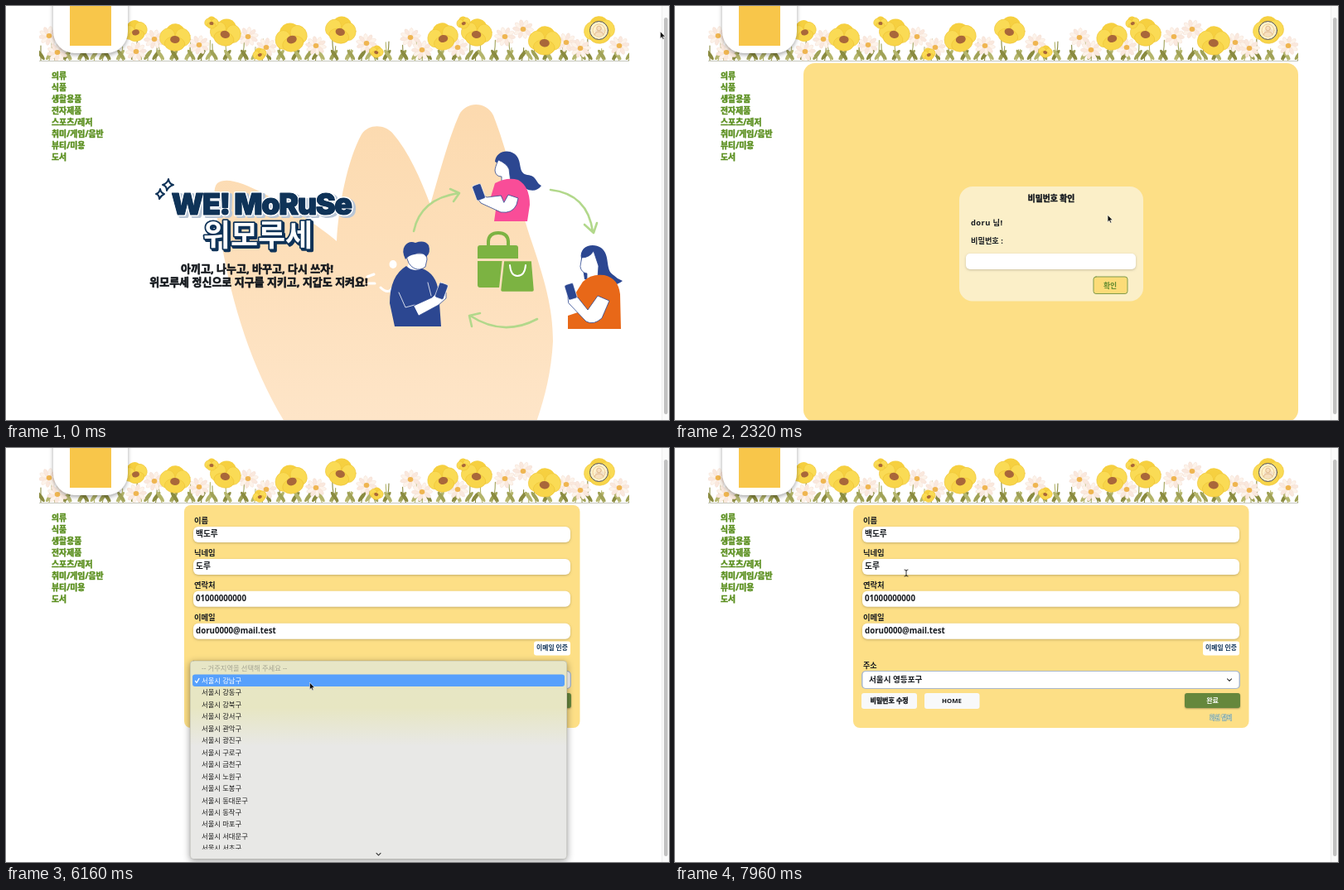
Animation of 800 by 500 pixels, one loop 8000 ms. Source, as an HTML page with a canvas:

```html
<!DOCTYPE html>
<html lang="ko">
<head>
<meta charset="utf-8">
<title>Member page walkthrough</title>
<style>
html, body { margin: 0; width: 100%; height: 100%; overflow: hidden; background: #fff; }
canvas { display: block; width: 800px; height: 500px; }
</style>
</head>
<body>
<canvas id="stage" width="800" height="500"></canvas>
<script>
const ctx = document.getElementById('stage').getContext('2d');
const LOOP = 8000;
const FONT = '"Noto Sans", "Noto Sans CJK KR", "Noto Sans CJK JP", sans-serif';
const NAVY = '#0f3358', BLUE = '#2c4791', INK = '#161a1f', YELLOW = '#fddf86';

const clamp = v => Math.max(0, Math.min(1, v));
const ramp = (t, a, b) => clamp((t - a) / (b - a));
const ease = v => v * v * (3 - 2 * v);

function text(s, x, y, size, color = INK, weight = 700, align = 'left', space = 0, font = FONT) {
  ctx.font = `${weight} ${size}px ${font}`;
  ctx.letterSpacing = space + 'px';
  ctx.textAlign = align;
  ctx.fillStyle = ctx.strokeStyle = color;
  ctx.fillText(s, x, y + size * 0.36);
  // Thicken the heaviest weight towards a display face.
  if (weight === 900) {
    ctx.lineWidth = size * 0.05;
    ctx.strokeText(s, x, y + size * 0.36);
  }
}

function outlined(s, x, y, size, fill, line, width, space = 0, font = FONT) {
  ctx.font = `900 ${size}px ${font}`;
  ctx.letterSpacing = space + 'px';
  ctx.textAlign = 'center';
  ctx.lineJoin = 'round';
  ctx.lineWidth = width;
  ctx.strokeStyle = line;
  ctx.strokeText(s, x, y + size * 0.36);
  ctx.fillStyle = fill;
  ctx.fillText(s, x, y + size * 0.36);
}

function shape(d, fill, line, width = 1) {
  const p = new Path2D(d);
  if (fill) { ctx.fillStyle = fill; ctx.fill(p); }
  if (line) {
    ctx.lineWidth = width;
    ctx.lineJoin = ctx.lineCap = 'round';
    ctx.strokeStyle = line;
    ctx.stroke(p);
  }
}

function box(x, y, w, h, r, fill, line, width = 1) {
  ctx.beginPath();
  ctx.roundRect(x, y, w, h, r);
  if (fill) { ctx.fillStyle = fill; ctx.fill(); }
  if (line) { ctx.lineWidth = width; ctx.strokeStyle = line; ctx.stroke(); }
}

function oval(x, y, rx, ry, fill, line, width = 1, turn = 0) {
  ctx.beginPath();
  ctx.ellipse(x, y, rx, ry, turn, 0, 7);
  if (fill) { ctx.fillStyle = fill; ctx.fill(); }
  if (line) { ctx.lineWidth = width; ctx.strokeStyle = line; ctx.stroke(); }
}

function shadowed(color, blur, dy, draw) {
  ctx.save();
  ctx.shadowColor = color;
  ctx.shadowBlur = blur;
  ctx.shadowOffsetY = dy;
  draw();
  ctx.restore();
}

function at(x, y, turn, draw, scale = 1) {
  ctx.save();
  ctx.translate(x, y);
  ctx.rotate(turn);
  ctx.scale(scale, scale);
  draw();
  ctx.restore();
}

// Banner
const poppies = [[204, 38, 18], [265, 32, 18], [248, 20, 8], [344, 38, 19], [404, 29, 18], [447, 55, 8],
  [527, 37, 18], [568, 32, 18], [552, 20, 8], [650, 42, 19], [716, 29, 18], [156, 30, 14], [306, 58, 8]];
const daisies = [[179, 40], [233, 47], [292, 37], [314, 50], [374, 48], [435, 45], [488, 38], [502, 53],
  [545, 50], [602, 37], [624, 28], [676, 44], [693, 51], [740, 48], [157, 55], [52, 36], [62, 56]];

function poppy(x, y, r) {
  at(x, y, Math.sin(x) * .3, () => {
    oval(0, -r * .38, r * .62, r * .55, '#f6d040');
    oval(-r * .52, 0, r * .5, r * .6, '#fadb55', '#eec436', .6, .3);
    oval(r * .52, -r * .05, r * .5, r * .6, '#fadb55', '#eec436', .6, -.3);
    oval(0, r * .42, r * .68, r * .48, '#f8d54a', '#eec436', .6);
    oval(0, r * .14, r * .32, r * .25, '#a9673a');
  });
}

function daisy(x, y) {
  for (let i = 0; i < 10; i++) {
    const a = i * .628 + x;
    oval(x + Math.cos(a) * 7.5, y + Math.sin(a) * 6.5, 5, 2.4, i % 2 ? '#fdf3ea' : '#fae8dd', '#f1dccf', .4, a);
  }
  oval(x, y, 3.3, 2.9, '#efb550');
}

function banner() {
  ctx.save();
  ctx.beginPath();
  ctx.rect(40, 0, 712, 66);
  ctx.clip();
  ctx.fillStyle = '#fff';
  ctx.fillRect(40, 0, 712, 66);
  for (let i = 0; i < 78; i++) {
    const x = 42 + i * 9.2, lean = Math.sin(i * 2.7) * 7, top = 48 + Math.sin(i * 1.9) * 8;
    const green = ['#8a8b40', '#b4b56c', '#a0a257'][i % 3];
    shape(`M${x} 68Q${x + lean} 60 ${x + lean} ${top}`, null, green, 1.1);
    oval(x + lean * .6, 59, 7.5, 2.3, green, null, 0, lean > 0 ? -.9 : -2.2);
  }
  daisies.forEach(d => daisy(...d));
  poppies.forEach(p => poppy(...p));
  ctx.restore();
  ctx.fillStyle = '#c6c7bd';
  ctx.fillRect(40, 66, 712, 1);
}

function header() {
  banner();
  shadowed('rgba(0,0,0,.35)', 5, 2, () => box(57, -32, 90, 89, 26, '#fff'));
  box(77, -2, 50, 50, 0, '#f8c64a');
  oval(715.5, 29.5, 11, 11, 'rgba(255,246,222,.86)', '#4c4d57', 1);
  oval(715.5, 29.5, 7.5, 7.5, null, '#e6c08f', .8);
  oval(715.5, 27, 2.8, 2.8, '#f7dfbd', '#d9a877', .7);
  shape('M710 35Q711 31 715.5 31Q720 31 721 35', '#f7dfbd', '#d9a877', .7);
  ['의류', '식품', '생활용품', '전자제품', '스포츠/레저', '취미/게임/음반', '뷰티/미용', '도서']
    .forEach((s, i) => text(s, 55, 84 + i * 14.05, 9.9, '#5c9021', 900));
}

function scrollbar() {
  ctx.fillStyle = '#fafafa';
  ctx.fillRect(792, 0, 8, 500);
  ctx.fillStyle = '#ededed';
  ctx.fillRect(791, 0, 1, 500);
  box(794, 14, 4.5, 479, 2.2, '#c1c1c1');
}

// Home page
function petals() {
  const g = ctx.createLinearGradient(0, 120, 0, 500);
  g.addColorStop(0, '#fcdaaf');
  g.addColorStop(.5, '#fddfba');
  g.addColorStop(1, '#fee5c8');
  shape(`M336 502C298 440 272 360 260 285C254 250 247 222 255 214C266 206 286 214 310 226C345 244 378 266 399 284
    C401 242 412 186 429 155C438 142 456 143 466 153C486 176 500 208 512 240C522 206 534 160 547 131
    C556 115 579 115 588 132C604 172 616 226 632 278C650 330 660 365 660 405C658 442 650 474 640 502Z`, g);
  oval(467, 312, 4.5, 5, '#fff');
  shape('M452 340Q462 350 468 338Q474 347 486 335M436 327l8 -3M438 335l7 0', null, '#fff', 3);
}

function phone(x, y, turn) {
  at(x, y, turn, () => box(-5, -9.5, 11, 19, 2, BLUE, '#fff', .6));
}

function caller() {
  shape('M590 188C591 173 612 171 618 184C622 193 619 202 629 204C641 205 639 214 646 217C640 226 627 224 620 214C608 213 603 204 604 196Z', BLUE);
  shape('M594 186Q590 195 590 199Q591 206 598 206L598 214L609 213L607 197Q604 190 594 186Z', '#fff', BLUE, .8);
  shape('M590 214Q605 206 618 210Q632 218 632 240L629 260H589L591 246L582 240Z', '#f94d98');
  shape('M597 229L580 231L573 226L568 231L573 238L597 249Q611 251 616 240L618 232L606 228L601 237Z', '#fff', BLUE, .8);
  phone(570, 225, -.35);
}

function boy() {
  shape('M484 317L486 310L500 314L500 321Q492 326 484 317Z', '#fff');
  shape('M483 299H507L508 306L506 315Q500 320 493 317Q484 313 483 299Z', '#fff', BLUE, .8);
  shape('M482 306Q477 296 481 290Q486 283 494 286Q505 282 510 289Q513 298 507 303Q502 296 493 300Q486 301 482 306Z', BLUE);
  shape('M483 314Q491 322 502 317Q519 323 522 345L525 387H469L463 359Q463 326 483 314Z', BLUE);
  shape('M474 346L482 364L493 361M509 334L513 350', null, '#fff', .8);
  shape('M492 362L514 352L521 345L531 346L531 353L522 361L498 374Z', '#fff', BLUE, .8);
  phone(525, 344, .35);
}

function woman() {
  shape('M694 305C691 290 708 285 718 292C730 301 722 318 733 325Q738 330 744 332Q733 341 718 335L698 330Z', BLUE);
  shape('M695 304Q704 304 709 296L715 314L714 328L701 330L701 323Q694 322 693 315Z', '#fff', BLUE, .8);
  shape('M696 333Q706 323 722 325Q739 329 741 348L742 390H678V374L690 370L684 352Z', '#e86818');
  shape('M678 349L690 352L702 367L714 350L728 356L719 377Q709 386 700 381L679 359Z', '#fff', BLUE, .8);
  phone(681, 345, -.3);
}

function bags() {
  const green = '#7cb342', gap = '#fee0bd';
  shape('M582 290V284Q583 274 594 274Q605 274 606 284V290', null, green, 4);
  box(569, 289, 49, 51, 3, green);
  ctx.fillStyle = gap;
  ctx.fillRect(569, 305, 49, 3);
  shape('M600 307H635L638 343Q638 346 635 346H599Q596 346 596 343Z', green, gap, 2.5);
  shape('M608 313Q609 326 617 326Q626 326 627 313', null, '#fff', 2);
}

function home() {
  petals();
  const latin = 'Inter, "Noto Sans", sans-serif';
  outlined('WE! MoRuSe', 311, 241, 36, '#b9c6d6', '#b9c6d6', 4, -1.5, latin);
  outlined('WE! MoRuSe', 308, 239, 36, NAVY, '#fff', 4, -1.5, latin);
  outlined('WE! MoRuSe', 308, 239, 36, NAVY, NAVY, 1, -1.5, latin);
  outlined('위모루세', 306, 279, 36, NAVY, NAVY, 4);
  outlined('위모루세', 304, 277, 36, '#fff', NAVY, 3.5);
  shape('M196 209Q197 215 202 216Q196 218 194 223Q194 217 189 216Q195 214 196 209ZM186 221Q187 226 191 227Q187 229 185 233Q185 228 181 227Q185 226 186 221Z', '#fff', NAVY, 2);
  text('아끼고, 나누고, 바꾸고, 다시 쓰자!', 303, 317, 13, INK, 900, 'center');
  text('위모루세 정신으로 지구를 지키고, 지갑도 지켜요!', 305, 333.5, 13, INK, 900, 'center');
  shape('M492 272Q500 233 546 226M536 221L547 226L540 236M657 222Q702 227 708 273M698 264L709 274L713 262M641 378Q600 400 560 374M572 371L559 374L562 387', null, '#b2d88b', 2.6);
  bags();
  caller();
  boy();
  woman();
}

// Drawer
function bloom(x, y, r) {
  for (let i = 0; i < 6; i++) {
    const a = i * 1.047;
    oval(x + Math.cos(a) * r * .68, y + Math.sin(a) * r * .68, r * .42, r * .34, '#fff', '#555', .7, a);
  }
  oval(x, y, r * .36, r * .36, '#fff', '#555', .7);
}

function planter() {
  const line = '#555';
  ['REDUCE', 'REUSE', 'RECYCLE'].forEach((s, i) =>
    outlined(s, 706, 322 + i * 20.5, 19.5, '#fff', '#8a8a8a', 1.4, 0, 'Inter, sans-serif'));
  shape('M691 395V434M727 402V434M701 422V434', null, line, .8);
  [[679, 434, -.55], [668, 433, -.95], [688, 434, -.15], [716, 434, .2], [734, 434, .5], [744, 434, .95]]
    .forEach(([x, y, a]) => at(x, y, a, () => shape('M0 0Q-11 -15 0 -30Q11 -15 0 0V-24', '#fff', line, .7)));
  bloom(691, 389, 17);
  bloom(726, 395, 15);
  bloom(701, 413, 13);
  shape('M663 449H750L743 492H670Z', '#fff', line, .9);
  box(656, 434, 100, 15, 3, '#fff', line, .9);
  for (let i = 0; i < 3; i++)
    at(706.5, 473, i * 2.094, () => shape('M-9 -6L-4 -15H5L9 -8L12 -10L10 -1L1 -4L4 -6L1 -10L-4 -3Z', '#fff', line, .7), 1.25);
}

function drawer(slide) {
  ctx.save();
  ctx.beginPath();
  ctx.rect(0, 0, 792, 500);
  ctx.clip();
  ctx.translate(168 * (1 - slide), 0);
  shadowed('rgba(0,0,0,.4)', 12, 2, () => box(625, -5, 180, 510, 0, '#fff'));
  shape('M631 6L639 14M639 6L631 14', null, '#111', 1.4);
  text('Today 2024 3 22', 782, 31, 7.4, NAVY, 600, 'right', .4);
  text('ID: doru', 635, 55, 8.2, NAVY, 600, 'left', .4);
  text('닉네임: 도루', 635, 67, 8.3, NAVY, 600);
  box(741, 89, 45, 12, 1.5, '#193b57');
  text('회원정보수정', 763.5, 95, 7.2, '#fff', 400, 'center');
  const g = ctx.createLinearGradient(672, 0, 744, 0);
  g.addColorStop(0, '#59cce0');
  g.addColorStop(.5, '#b9b9e8');
  g.addColorStop(1, '#e8c2e4');
  oval(708, 147, 36, 36, g);
  ctx.save();
  ctx.beginPath();
  ctx.arc(708, 147, 36, 0, 7);
  ctx.clip();
  oval(708, 139.5, 11, 11.5, '#fbf3df');
  oval(708, 176, 24, 19, '#fbf3df');
  ctx.restore();
  oval(642, 201, 6.2, 5.5, '#f8c84b');
  shape('M637 203L636 208L642 206Z', '#f8c84b');
  [639, 642, 645].forEach(x => oval(x, 201, .8, .8, '#fff'));
  shadowed('rgba(0,0,0,.2)', 3, 1, () => box(638, 221, 143, 31, 9, '#fff', '#c6d4de', .7));
  box(640, 223, 139, 27, 8, null, '#b5c6d3', .6);
  shape('M643 234V231L646 229L649 231V234ZM645 231V229H648', null, '#555', .6);
  text('판매 게시글', 649, 240, 6.7, NAVY, 700);
  box(771, 272, 7, 11, 1, '#111');
  shape('M779 273H781V275M779 283H781V281M776 278H782M780 276L782.5 278L780 280', null, '#111', 1.1);
  planter();
  ctx.restore();
}

// Password page
function passwordPage(dots) {
  box(155, 69, 597, 433, 14, YELLOW);
  box(343, 218, 222, 138.5, 16, '#fbefc8');
  text('비밀번호 확인', 454, 232, 9.8, INK, 900, 'center');
  text('doru 님!', 357, 262, 9.4, INK, 600, 'left', .4);
  text('비밀번호 :', 357, 284, 9.2, INK, 600);
  shadowed('rgba(0,0,0,.2)', 3, 1, () => box(351, 299, 205, 19, 5, '#fff'));
  for (let i = 0; i < dots; i++) oval(356 + i * 4.3, 309, 1, 1, '#111');
  box(505, 327, 41, 20.5, 3, '#fcdc78', '#7f9b4c');
  text('확인', 525, 337.5, 8.8, '#5f8a2f', 600, 'center');
}

// Profile form
const districts = ['강남', '강동', '강북', '강서', '관악', '광진', '구로', '금천', '노원', '도봉', '동대문', '동작', '마포',
  '서대문', '서초', '성동', '성북', '송파', '양천', '영등포', '용산', '은평', '종로', '중'].map(s => `서울시 ${s}구`);

function chevron(x, y) {
  shape(`M${x - 2.5} ${y - 1.2}L${x} ${y + 1.3}L${x + 2.5} ${y - 1.2}`, null, '#333', 1.1);
}

function formPage(place, hover, focus) {
  box(215, 69, 477.5, 269, 8, YELLOW);
  [['이름', '백도루'], ['닉네임', '도루'], ['연락처', '01000000000'], ['이메일', 'doru0000@mail.test']].forEach(([label, value], i) => {
    const y = 88 + i * 38.9;
    text(label, 227, y, 9.3, INK, 600);
    shadowed('rgba(0,0,0,.22)', 3, 1, () => box(226, y + 7, 455, 19, 6, '#fff'));
    text(value, 229, y + 16, 9.7, INK, 700);
  });
  box(637, 233.5, 44, 17, 3, '#fff');
  text('이메일 인증', 659, 241.5, 7.8, NAVY, 800, 'center');
  text('주소', 227, 262.5, 9, INK, 600);
  if (focus) box(225, 269, 457, 22, 5, '#a9b7c9');
  box(226.5, 270, 454, 20, 4, '#fff');
  text(place, 234, 280, 9.6, INK, 700);
  chevron(669, 280);
  box(225, 296, 67, 19, 3, hover ? '#d3d4d5' : '#f8f9fa', hover ? '#c6c7c8' : null);
  text('비밀번호 수정', 258.5, 305.5, 8, INK, 900, 'center');
  box(301, 296, 66.5, 19, 3, '#f8f9fa');
  text('HOME', 334, 305.5, 7.8, INK, 800, 'center');
  shadowed('rgba(0,0,0,.3)', 2, 1, () => box(615, 296, 67, 18, 3, '#65873c'));
  text('완료', 648.5, 305, 8, '#fff', 800, 'center');
  outlined('회원 탈퇴', 658.5, 326, 6.9, '#f3e3a5', '#6a9fb4', 1);
}

function popup(top, pointerY, alpha) {
  ctx.save();
  ctx.globalAlpha = alpha;
  const g = ctx.createLinearGradient(0, 126, 0, 360);
  g.addColorStop(0, '#e7e4cd');
  g.addColorStop(.5, '#e7e6c8');
  g.addColorStop(.8, '#e7e6c2');
  g.addColorStop(1, '#e8e8e6');
  shadowed('rgba(0,0,0,.4)', 9, 2, () => box(222, top, 455, 496.5 - top, 4, g));
  box(222.3, top, 454.4, 496.5 - top, 4, null, 'rgba(120,120,110,.4)', .7);
  ctx.beginPath();
  ctx.rect(222, top, 455, 484.5 - top);
  ctx.clip();
  text('-- 거주지역을 선택해 주세요 --', 236, top + 9.5, 8.3, '#a5a492', 400);
  districts.forEach((s, i) => {
    const y = top + 23.8 + i * 14.47;
    const on = Math.abs(pointerY - y) < 7.235;
    if (on) box(225, y - 7.2, 449, 14.4, 3, '#57a0fc');
    text(s, 236, y, 8.35, on ? '#fff' : '#1b1b1b', 400);
    if (!i) shape(`M228.5 ${y + .5}L230 ${y + 2.8}L233 ${y - 2.4}`, null, on ? '#fff' : '#222', 1.2);
  });
  ctx.restore();
  ctx.globalAlpha = alpha;
  chevron(449.5, 490.5);
  ctx.globalAlpha = 1;
}

// Link preview and pointer
function linkNote(s, alpha) {
  if (alpha <= 0) return;
  const font = 'Roboto, sans-serif';
  ctx.globalAlpha = alpha;
  ctx.font = `400 7.1px ${font}`;
  ctx.letterSpacing = '0px';
  box(-3, 488, ctx.measureText(s).width + 10, 15, 3, '#d5e2f6', '#c3d0e4', .7);
  text(s, 3, 494, 7.1, '#3a4250', 400, 'left', 0, font);
  ctx.globalAlpha = 1;
}

const track = [[40, 789.5, 31], [800, 715, 29], [1000, 715, 29], [1540, 759, 96], [1840, 759, 96], [2560, 440, 307],
  [3060, 440, 307], [3400, 524, 336], [4000, 524, 336], [4520, 205, 322], [4860, 205, 322], [4990, 252, 303],
  [5040, 252, 303], [5280, 366.5, 283.5], [6180, 366.5, 283.5], [6460, 364.5, 412], [6980, 364.5, 412],
  [7120, 362.5, 422], [7460, 362.5, 422], [7940, 279, 151]];

function pointerAt(t) {
  const i = track.findIndex(k => k[0] > t);
  if (i === 0) return track[0].slice(1);
  if (i < 0) return track[track.length - 1].slice(1);
  const [ta, xa, ya] = track[i - 1], [tb, xb, yb] = track[i];
  const k = ease(ramp(t, ta, tb));
  return [xa + (xb - xa) * k, ya + (yb - ya) * k];
}

const within = (t, ...spans) => spans.some(([a, b]) => t >= a && t < b);

function pointer(t, x, y) {
  at(x, y, 0, () => {
    if (within(t, [2520, 3120], [7900, LOOP]))
      shape('M-2 -4Q0 -4 0 -2.5Q0 -4 2 -4M0 -3V3M-2 4Q0 4 0 2.5Q0 4 2 4', null, '#222', .9);
    else if (within(t, [3320, 3560], [4940, 5080]))
      shape('M-1 0Q0 -1 1 0V3.5L4 4Q5.5 4.5 5 6L4 9H-.5L-3.5 5.5Q-3 4 -1 5.5Z', '#fff', '#111', .9);
    else
      shape('M0 0V8.2L1.9 6.4L3.2 9.3L4.5 8.7L3.3 5.9H5.8Z', '#111', '#fff', .5);
  });
}

function draw(t) {
  ctx.fillStyle = '#fff';
  ctx.fillRect(0, 0, 800, 500);
  const [x, y] = pointerAt(t);
  if (t < 1880) home();
  else if (t < 3560) passwordPage([2720, 2840, 2960, 3080].filter(k => t >= k).length);
  else formPage(districts[t < 7440 ? 0 : 19], within(t, [4940, 5080]), t >= 6160);
  header();
  if (t >= 880 && t < 1880) drawer(1 - (1 - ramp(t, 860, 1120)) ** 3);
  if (t >= 6160 && t < 7560)
    popup(257 - 130.5 * ease(ramp(t, 6500, 6950)), y + 1, 1 - ramp(t, 7440, 7560));
  scrollbar();
  linkNote('webserver:0000/page/confirmsecret', ramp(t, 1440, 1540) - ramp(t, 1920, 2040));
  linkNote('webserver:0000/page/replaceSecrets', .55 * (ramp(t, 4940, 5000) - ramp(t, 5080, 5200)));
  pointer(t, x, y);
}

const start = performance.now();
function tick(now) {
  draw(Math.max(0, now - start) % LOOP);
  requestAnimationFrame(tick);
}
requestAnimationFrame(tick);
</script>
</body>
</html>
```
